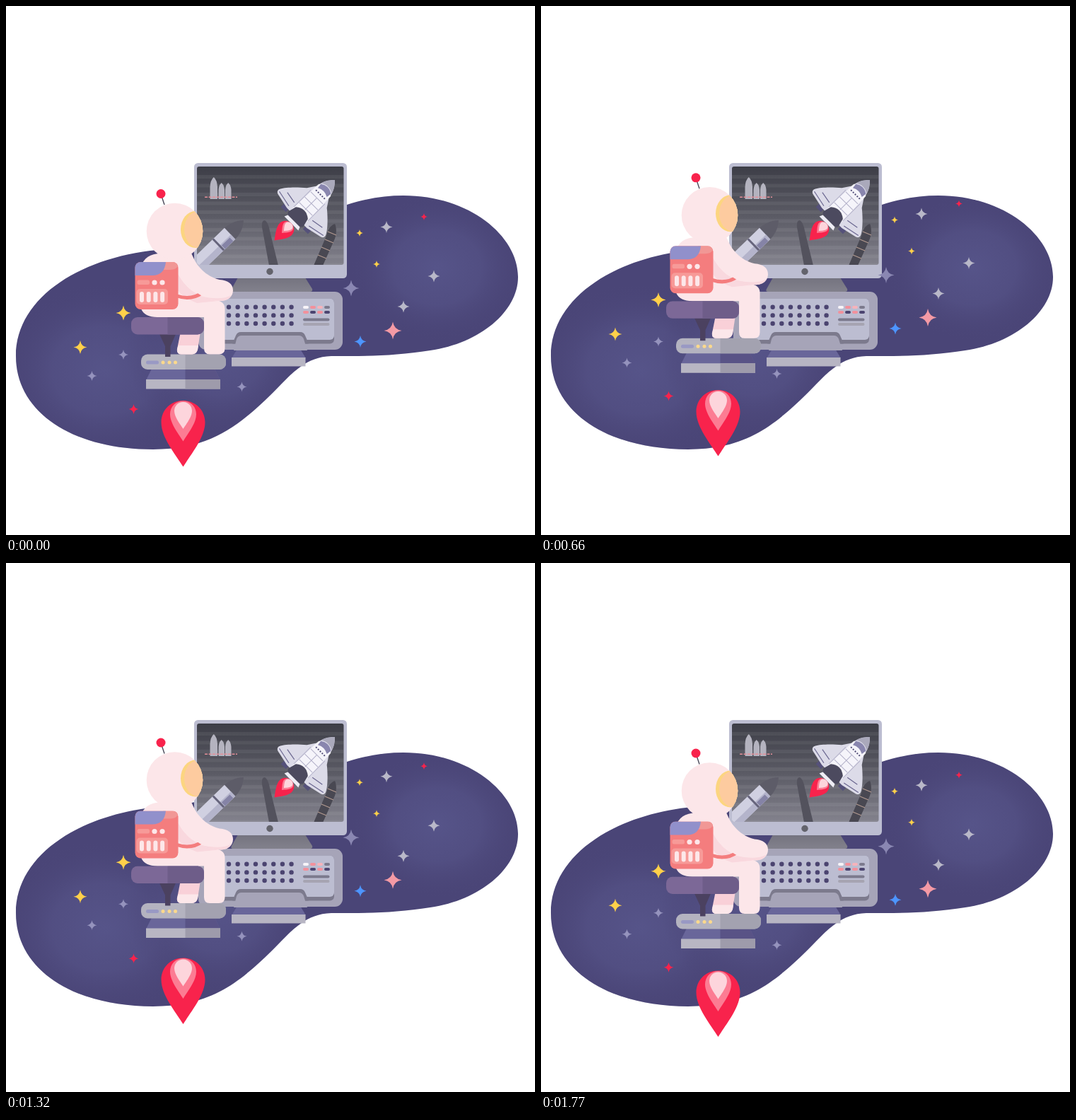
An HTML page that plays this animation: 748 by 748 pixels, repeating every 1800 ms.

```html
<!DOCTYPE html>
<html lang="en">
<head>
<meta charset="utf-8">
<title>Astronaut at a computer</title>
<style>
html, body { margin: 0; width: 100%; height: 100%; overflow: hidden; background: #fff; }
svg { display: block; width: 100vw; height: 100vh; }
</style>
</head>
<body>
<svg viewBox="0 0 748 748">
  <defs>
    <radialGradient id="glow">
      <stop offset="0" stop-color="#565489"/>
      <stop offset=".5" stop-color="#535084" stop-opacity=".85"/>
      <stop offset="1" stop-color="#4a4577" stop-opacity="0"/>
    </radialGradient>
    <linearGradient id="glass" x2="0" y2="1">
      <stop offset="0" stop-color="#3d3e47"/>
      <stop offset=".5" stop-color="#5b5b65"/>
      <stop offset="1" stop-color="#83828d"/>
    </linearGradient>
    <linearGradient id="neck" x2="0" y2="1">
      <stop offset="0" stop-color="#74737f"/>
      <stop offset="1" stop-color="#82818c"/>
    </linearGradient>
    <clipPath id="blobClip"><path id="blob" d="M14 495C14 410 110 352 225 344C300 338 400 300 482 281C510 272 535 268 562 268C655 268 724 325 724 383C724 432 670 477 600 487C550 495 510 495 460 495C420 496 400 525 372 552C330 592 290 627 208 627C95 627 14 575 14 495Z"/></clipPath>
    <clipPath id="screenClip"><rect x="270" y="227" width="207.500" height="139" rx="3"/></clipPath>
    <clipPath id="helmetClip"><circle cx="238.500" cy="318.500" r="39.800"/></clipPath>
    <clipPath id="packClip"><rect x="182.500" y="362" width="61" height="67" rx="8"/></clipPath>
    <clipPath id="seatClip"><rect x="177" y="440" width="103" height="24.500" rx="9"/></clipPath>
    <clipPath id="barClip"><rect x="191" y="492.500" width="120" height="21.500" rx="9"/></clipPath>
  </defs>

  <use href="#blob" fill="#4a4577"/>
  <g clip-path="url(#blobClip)" fill="url(#glow)">
    <ellipse cx="140" cy="515" rx="150" ry="125"/>
    <ellipse cx="300" cy="490" rx="130" ry="120"/>
    <ellipse cx="610" cy="370" rx="125" ry="105"/>
  </g>

  <!-- monitor -->
  <path d="M328 384H423L433 400Q434 404 430 404H321Q317 404 319 400Z" fill="url(#neck)"/>
  <rect x="266" y="222" width="216" height="163" rx="5.500" fill="#bcbdd1"/>
  <circle cx="373" cy="375.500" r="4.700" fill="#63636c"/>
  <g clip-path="url(#screenClip)">
    <rect x="270" y="227" width="208" height="140" fill="url(#glass)"/>
    <g id="stripes" fill="#fff" fill-opacity=".06"></g>

    <path d="M288.500 273V256Q289 246 293.800 242Q298.500 246 299 256V273ZM300.500 273V260Q301 253 304.700 250Q308.500 253 309 260V273ZM310 273V260Q310.500 253 314.200 250Q318 253 318.500 260V273Z" fill="#b4b3bf"/>
    <path d="M281 270.200H327" stroke="#e58f99" stroke-width="1.500" stroke-dasharray="4 1.500"/>

    <g transform="translate(336 303) rotate(46)">
      <path d="M0 0C8 9 11 18 11 29H-11C-11 18-8 9 0 0Z" fill="#5d5c68"/>
      <path d="M-11 27H11V120H-11Z" fill="#d0d0e1"/>
      <path d="M2 27H11V120H2Z" fill="#b4b4cb"/>
      <path d="M4 31H11V47H4Z" fill="#8583a6"/>
      <path d="M-11 48H11V51H-11Z" fill="#66647c"/>
    </g>

    <path d="M362 313Q361 303 366 303Q371 306 373 318L385 367H372Z" fill="#53525d"/>
    <path d="M465 308C457 311 455 318 453 325L435 367H448L465 329C468 320 467 312 465 308Z" fill="#494852"/>
    <path d="M455 319L467 324M451 330L463 335M446 341L458 346M441 352L453 357" stroke="#b39a90" stroke-width="1.200"/>

    <g transform="translate(465 246) rotate(45)">
      <path d="M-27 69H-17V81H-27ZM17 69H27V81H17Z" fill="#55517a"/>
      <path d="M0 0C6 6 11 14 12 24L20 36C30 44 42 56 46 64Q48 69 43 71L20 76H-20L-43 71Q-48 69-46 64C-42 56-30 44-20 36L-12 24C-11 14-6 6 0 0Z" fill="#dcdbe8"/>
      <path d="M-44 67L-20 72M44 67L20 72M-35 60L-18 63M35 60L18 63" stroke="#6b6790" stroke-width="1.200"/>
      <path d="M-12 20Q0 13 12 20L14 72H-14Z" fill="#f5f4fa"/>
      <path d="M0 0C5 5 9 10 10.500 17Q0 10-10.500 17C-9 10-5 5 0 0Z" fill="#aaa9bb"/>
      <path d="M-10 18Q0 11 10 18L9 25Q0 20-9 25Z" fill="#8986ae"/>
      <path d="M-9 29H9" stroke="#55517a" stroke-width="2" stroke-dasharray="2 2"/>
      <path d="M-12 36H12M-13 47H13M-13 58H13M0 36V60M-14 34V68M14 34V68" stroke="#b3b1c9" stroke-width="1" fill="none"/>
      <path d="M-12 66Q0 56 12 66L15 78Q14 82 9 82H-9Q-14 82-15 78Z" fill="#4c4a5f"/>
      <path d="M-12 82H12L14 87H-14Z" fill="#eeedf5"/>
      <g id="jet"></g>
    </g>
  </g>

  <!-- console -->
  <path d="M327 485H416L424 498H319Z" fill="#69669a"/>
  <rect x="319" y="497" width="104.500" height="12.500" fill="#b7b5c3"/>
  <rect x="272" y="404" width="204" height="82" rx="11" fill="#a6a4b8"/>
  <rect x="282" y="413.500" width="182" height="64" rx="6" fill="#7c7a8d"/>
  <rect x="282" y="413.500" width="182" height="58.500" rx="6" fill="#bcbdd1"/>
  <path d="M320 477.500L325 466Q327 461 332 461H416Q421 461 423 466L428 477.500Z" fill="#7c7a8d"/>
  <path d="M322 487L326 471Q328 466 333 466H414Q419 466 421 471L426 487Z" fill="#a6a4b8"/>
  <g id="keys"></g>
  <rect x="420" y="441.500" width="37.500" height="4" rx="2" fill="#7c7a8d"/>
  <rect x="420" y="448" width="37.500" height="4" rx="2" fill="#a6a4b2"/>

  <g id="stars"></g>
  <g id="flame"></g>

  <g id="astronaut">
    <!-- stool base -->
    <path d="M206 513H295L303 529H198Z" fill="#69669a"/>
    <path d="M253.500 513H295L303 529H253.500Z" fill="#595386"/>
    <path d="M198 528H303V541.500H198Z" fill="#b8b6c3"/>
    <path d="M253.500 528H303V541.500H253.500Z" fill="#9e9bab"/>
    <g clip-path="url(#barClip)">
      <path d="M190 492H312V515H190Z" fill="#b4b3c0"/>
      <path d="M253.500 492H312V515H253.500Z" fill="#a3a2b0"/>
    </g>
    <rect x="198" y="501.500" width="18" height="5" rx="2.500" fill="#9999c4"/>
    <g fill="#fcd98c"><circle cx="222" cy="504" r="2.500"/><circle cx="231" cy="504" r="2.500"/><circle cx="239.500" cy="504" r="2.500"/></g>
    <path d="M217 464H240L232.500 481V496H225V481Z" fill="#4b4160"/>

    <!-- legs and torso -->
    <path d="M247 460H275L271 486Q269 492.500 263 492.500H248Q241 492.500 242 485Z" fill="#f9d0d8"/>
    <path d="M243.500 480H272L271 486Q269 492.500 263 492.500H248Q241 492.500 242 485Z" fill="#fce7ea"/>
    <path d="M192 365C198 353 208 349.500 225 349.500H262L276 380L284 414C301 415 309.500 418 309.500 428V484Q309.500 492.500 301 492.500H288Q280 492.500 280 484V440H214C202 440 194 436 191 428Z" fill="#fce6e9"/>
    <path d="M240 372C250 396 268 412 300 417L270 420Q252 414 243 402Z" fill="#f9d8de"/>
    <path d="M242 410Q262 417 278 405" stroke="#f47d7e" stroke-width="5" fill="none"/>
    <path d="M233 352L262 351C270 368 282 382 302 387C314 388 321 393 321 402C321 411 314 416.500 304 417C278 417 254 396 240 372Z" fill="#fce6e9"/>
    <path d="M275 410Q288 417 304 417Q314 417 319 409Q303 417 275 410Z" fill="#f9d8de"/>

    <!-- seat -->
    <g clip-path="url(#seatClip)">
      <path d="M176 440H281V465H176Z" fill="#7c6897"/>
      <path d="M228.500 440H281V465H228.500Z" fill="#6e5d89"/>
    </g>

    <!-- backpack -->
    <g clip-path="url(#packClip)">
      <path d="M182 362H244V430H182Z" fill="#f47d7e"/>
      <path d="M222 362H244Q244 373 232 373H222Z" fill="#f19795"/>
      <path d="M182 362H226Q224 381 207 381H182Z" fill="#9190cb"/>
    </g>
    <rect x="185.500" y="387.500" width="17.500" height="6.500" rx="2.500" fill="#f79a98"/>
    <rect x="184.500" y="400" width="44.500" height="22" rx="5" fill="#f79a98"/>
    <g id="pack" fill="#fde7e9"><circle cx="210" cy="391" r="3.600"/><circle cx="221" cy="391" r="3.600"/></g>

    <!-- helmet -->
    <path d="M219 266L224 281" stroke="#4b4a5a" stroke-width="1.400"/>
    <circle cx="219" cy="265.500" r="6.500" fill="#f8234c"/>
    <circle cx="238.500" cy="318.500" r="39.800" fill="#fce6e9"/>
    <g clip-path="url(#helmetClip)">
      <ellipse cx="268" cy="316" rx="21" ry="26" fill="#fcd580"/>
      <ellipse cx="273" cy="316" rx="21" ry="26" fill="#fdcb9f"/>
    </g>
  </g>
</svg>
<script>
const LOOP = 1800, FRAME = 30;
const get = id => document.getElementById(id);
const add = (id, markup) => get(id).insertAdjacentHTML('beforeend', markup);
const rect = (x, y, w, h, r, fill) =>
  `<rect x="${x}" y="${y}" width="${w}" height="${h}" rx="${r}"${fill ? ` fill="${fill}"` : ''}/>`;

// Teardrop with a round top and its point at the bottom
function drop(x, top, w, h, fill) {
  const mid = top + h * .33, tip = top + h;
  const side = s => [x + s * w, mid];
  return `<path fill="${fill}" d="M${x} ${tip}C${x - w * .34} ${tip - h * .18} ${x - w} ${tip - h * .44} ${side(-1)}` +
    `C${x - w} ${top + h * .14} ${x - w * .56} ${top} ${x} ${top}` +
    `C${x + w * .56} ${top} ${x + w} ${top + h * .14} ${side(1)}` +
    `C${x + w} ${tip - h * .44} ${x + w * .34} ${tip - h * .18} ${x} ${tip}Z"/>`;
}

function star([x, y, r, fill]) {
  return `<path transform="translate(${x} ${y}) scale(${r})" fill="${fill}"
    d="M0-1Q.13-.13 1 0Q.13 .13 0 1Q-.13 .13-1 0Q-.13-.13 0-1Z"/>`;
}

const red = '#f8234c', yellow = '#ffd04a', dim = '#9593bd', grey = '#b9b8c8';
const stars = [
  [105, 482.5, 9.5, yellow], [166, 434, 10.5, yellow], [500, 321, 5, yellow], [524, 365, 5, yellow],
  [166, 493, 7, dim], [121.5, 523, 7, dim], [333.5, 538.5, 7, dim], [488, 399, 11.5, '#8a87b2'],
  [538, 312.5, 8.5, grey], [605, 382, 8.5, grey], [562, 425, 8.5, grey],
  [547, 459, 12.5, '#f49aa5'], [501, 474.5, 8.5, '#4d95ff'], [180.5, 570, 7, red], [591, 298, 5, red]
];
add('stars', stars.map(star).join(''));

add('flame', drop(250.5, 558, 31, 93.5, red) + drop(250.5, 558.5, 18.5, 57, '#fc7c93') + drop(250.5, 560, 12.5, 38, '#fdd5dc'));
add('jet', drop(0, 87, 12, 34, red) + drop(0, 87, 8, 19, '#fc7c93') + drop(0, 87, 6, 15, '#fdd5dc'));

for (let y = 239; y < 366; y += 12.5) add('stripes', rect(270, y, 208, 5, 0));
for (let i = 0; i < 4; i++) add('pack', rect(189 + i * 9.7, 404, 6, 15, 3));

for (let row = 0; row < 3; row++)
  for (let col = 0; col < 8; col++)
    add('keys', `<circle cx="${315 + col * 12.65}" cy="${425.8 + row * 11.6}" r="3.2" fill="#4b4470"/>`);
const pink = '#f2919c', dark = '#4b4470';
['#f7f4f8', pink, '#f5b3bb', '#7c7a8d', pink, dark, pink, dark].forEach((fill, i) =>
  add('keys', rect(420 + i % 4 * 10, i < 4 ? 424 : 431, 8, 4, 2, fill)));

// Vertical shifts as [time, y], joined by a smooth curve
const tracks = {
  astronaut: [[0, 0], [390, -14.3], [540, -19.8], [660, -22.7], [900, -25.4], [1170, -17.5], [1470, -5.5], [1770, 3.5]],
  stars: [[0, 0], [390, -9.2], [660, -18.6], [900, -22.4], [1170, -17], [1470, -4.7], [1770, 1.8]],
  flame: [[0, 0], [390, -9.2], [660, -15], [870, -17], [900, -16.3], [1170, -5.5], [1470, 6.5], [1770, 18.5]]
};

function valueAt(keys, t) {
  const last = keys.length - 1;
  let i = 0;
  while (i < last - 1 && t >= keys[i + 1][0]) i++;
  const slope = k => {
    const a = keys[Math.max(k - 1, 0)], b = keys[Math.min(k + 1, last)];
    return (b[1] - a[1]) / (b[0] - a[0]);
  };
  const [t0, y0] = keys[i], [t1, y1] = keys[i + 1];
  const d = t1 - t0, u = (t - t0) / d, v = 1 - u;
  return v * v * (1 + 2 * u) * y0 + u * u * (1 + 2 * v) * y1 + u * v * d * (v * slope(i) - u * slope(i + 1));
}

const start = performance.now();
function draw(now) {
  const t = Math.floor(Math.max(0, now - start) % LOOP / FRAME) * FRAME;
  for (const id in tracks)
    get(id).setAttribute('transform', `translate(0 ${valueAt(tracks[id], t).toFixed(2)})`);
  requestAnimationFrame(draw);
}
draw(start);
</script>
</body>
</html>
```
